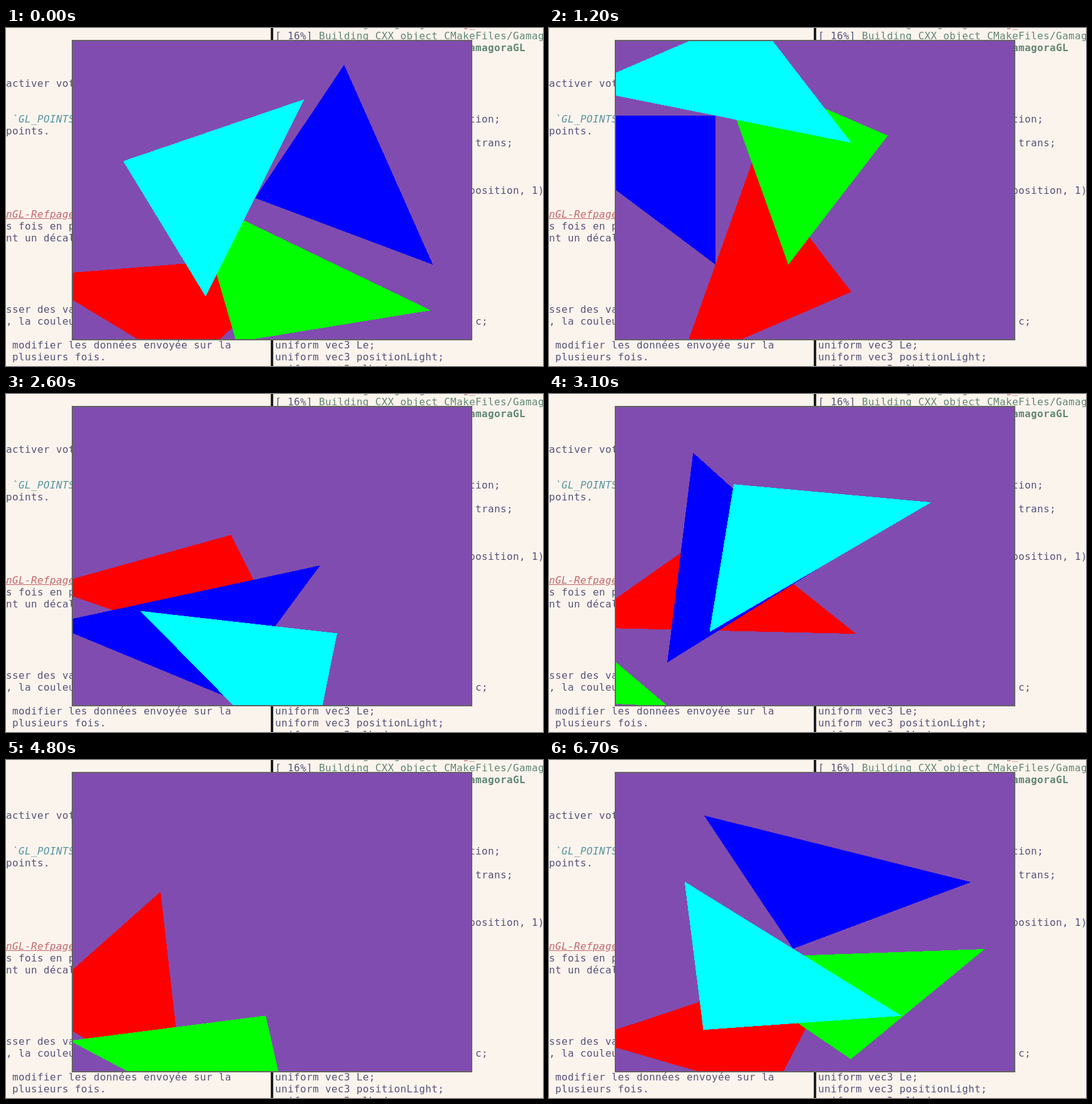
Recreate the animation shown at these times as an HTML page. Size 858 by 540 pixels, loop 6800 ms.

```html
<!DOCTYPE html>
<html lang="fr">
<head>
<meta charset="utf-8">
<title>Triangles</title>
<style>
  html, body { margin: 0; width: 100%; height: 100%; overflow: hidden; background: #fbf4ed; }
  #stage { position: relative; width: 858px; height: 540px; overflow: hidden; background: #fbf4ed; }
  #term span {
    position: absolute; white-space: pre; color: #575279;
    font: 16px/19px "DejaVu Sans Mono", monospace;
    letter-spacing: calc(10px - 1ch);
  }
  #term .green { color: #618774; }
  #term .bold { font-weight: bold; }
  #term .code { color: #56949f; font-style: italic; }
  #term .link { color: #c5676b; font-style: italic; text-decoration: underline; }
  #term .pink { color: #c5676b; }
  #divider { position: absolute; left: 423px; top: 0; width: 4px; height: 540px; background: #1e1e1e; }
  #win {
    position: absolute; left: 105px; top: 19px; width: 636px; height: 476px;
    border: 2px solid #636363; background: #814cb0;
  }
  #win svg { display: block; }
</style>
</head>
<body>
<div id="stage">
  <div id="term"></div>
  <div id="divider"></div>
  <div id="win">
    <svg width="636" height="476" viewBox="0 0 636 476" shape-rendering="crispEdges">
      <polygon fill="#f00"/>
      <polygon fill="#0f0"/>
      <polygon fill="#00f"/>
      <polygon fill="#0ff"/>
    </svg>
  </div>
</div>
<script>
  // Terminal text: row, x, text, style
  const LINES = [
    [4, 0, "activer votre"],
    [7, 10, "`GL_POINTS`", "code"],
    [8, 0, "points."],
    [15, 0, "nGL-Refpages", "link"],
    [16, 0, "s fois en p"],
    [17, 0, "nt un décal"],
    [23, 0, "sser des va"],
    [24, 0, ", la couleu"],
    [26, 10, "modifier les données envoyée sur la"],
    [27, 10, "plusieurs fois."],
    [-1, 500, "Building target glad", "green"],
    [-1, 730, "g_", "pink"],
    [0, 430, "[ 16%]"],
    [0, 500, "Building CXX object CMakeFiles/GamagoraGL", "green"],
    [1, 730, "GamagoraGL", "green bold"],
    [7, 740, "tion;"],
    [9, 750, "trans;"],
    [13, 740, "position, 1);"],
    [24, 750, "c;"],
    [26, 430, "uniform vec3 Le;"],
    [27, 430, "uniform vec3 positionLight;"],
    [28, 430, "uniform vec3 albedo;"]
  ];
  const term = document.getElementById("term");
  for (const [row, x, text, style = ""] of LINES) {
    const span = document.createElement("span");
    span.className = style;
    span.textContent = text;
    span.style.left = x + "px";
    span.style.top = 3 + 19 * row + "px";
    term.append(span);
  }

  const LOOP = 6800, STEP = 100;

  // Joint angle over time: [ms, degrees], with a short stall at 2400
  const ANGLES = [
    [0, -38.87], [1200, 30], [2400, 98.6], [2500, 98.6], [2600, 110.35],
    [3000, 127.5], [3600, 162], [4800, 229.85], [6000, 298.7], [6700, 338.85]
  ];

  // Right triangle corners and the corner of the parent that carries each child
  const CORNERS = [[-.5, -.5], [.5, -.5], [-.5, .5]];
  const JOINTS = [[.5, -.5], [.5, .5], [-.5, -.5], [0, 0]];
  const shapes = document.querySelectorAll("polygon");

  function angleAt(t) {
    const i = Math.max(1, ANGLES.findIndex(k => k[0] >= t));
    const [t0, a0] = ANGLES[i - 1], [t1, a1] = ANGLES[i];
    return a0 + (a1 - a0) * (t - t0) / (t1 - t0);
  }

  function place([cx, cy], deg, [x, y]) {
    const a = deg * Math.PI / 180, c = Math.cos(a), s = Math.sin(a);
    return [cx + x * c - y * s, cy + x * s + y * c];
  }

  const toPixels = ([x, y]) =>
    (318 * (1 + x)).toFixed(2) + "," + (238 * (1 - y)).toFixed(2);

  function draw(t) {
    const delta = angleAt(t);
    let center = [-.5, -.5], turn = 90;
    shapes.forEach((shape, i) => {
      turn += delta;
      const points = CORNERS.map(p => toPixels(place(center, turn, p)));
      shape.setAttribute("points", points.join(" "));
      center = place(center, turn, JOINTS[i]);
    });
  }

  const start = performance.now();
  function tick() {
    const t = (performance.now() - start) % LOOP;
    draw(Math.floor(t / STEP) * STEP);
    requestAnimationFrame(tick);
  }
  tick();
</script>
</body>
</html>
```
